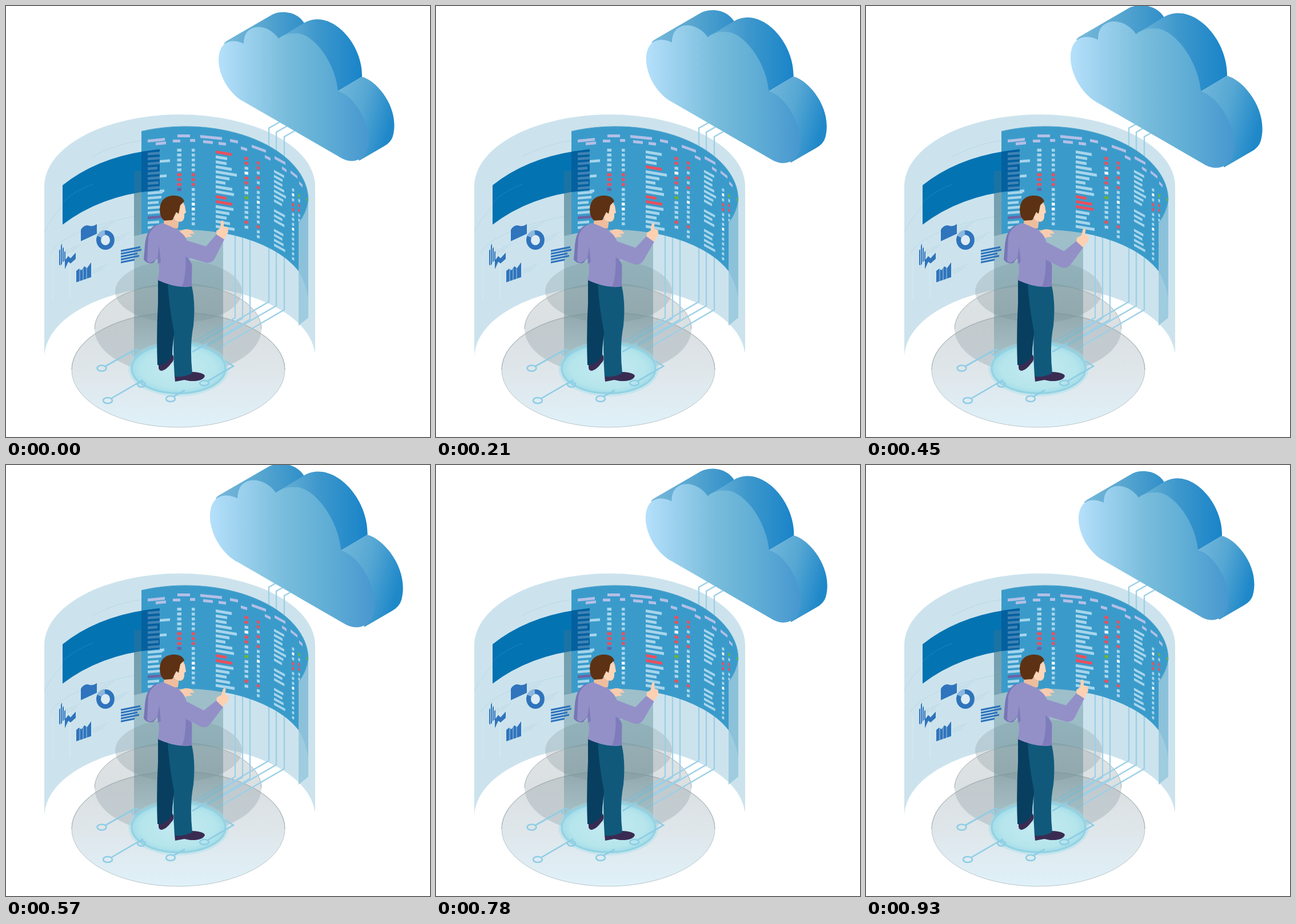
Write an HTML page that moves like this. It is 742 px wide and 755 px high and loops after 960 ms.

```html
<!DOCTYPE html>
<html lang="en">
<head>
<meta charset="utf-8">
<title>Cloud dashboard</title>
<style>
html, body { margin: 0; width: 100%; height: 100%; overflow: hidden; background: #fff; }
svg { display: block; width: 100vw; height: 100vh; }
</style>
</head>
<body>
<svg viewBox="0 0 742 755">
  <defs>
    <linearGradient id="front"><stop stop-color="#b5e0fb"/><stop offset=".45" stop-color="#78bcdb"/><stop offset=".72" stop-color="#5fadd5"/><stop offset="1" stop-color="#4797d0"/></linearGradient>
    <linearGradient id="sideA"><stop stop-color="#79b9da"/><stop offset=".5" stop-color="#57a6d0"/><stop offset="1" stop-color="#308fc9"/></linearGradient>
    <linearGradient id="sideB"><stop stop-color="#6db4d8"/><stop offset=".45" stop-color="#3f98cc"/><stop offset="1" stop-color="#1984c9"/></linearGradient>
    <linearGradient id="sideC" x1="0" y1="0" x2="1" y2=".4"><stop stop-color="#73b8db"/><stop offset=".5" stop-color="#56a7d3"/><stop offset="1" stop-color="#1f88c9"/></linearGradient>
    <linearGradient id="disc" x2="0" y2="1"><stop stop-color="#d9dddf"/><stop offset=".5" stop-color="#dfe6ea"/><stop offset="1" stop-color="#dff1f9"/></linearGradient>
    <linearGradient id="ring" x2="0" y2="1"><stop stop-color="#8b9ba1" stop-opacity=".28"/><stop offset="1" stop-color="#8b9ba1" stop-opacity=".34"/></linearGradient>
    <linearGradient id="beam" x2="0" y2="1"><stop stop-color="#4d8799" stop-opacity=".5"/><stop offset=".35" stop-color="#5f8f99" stop-opacity=".42"/><stop offset=".75" stop-color="#62888f" stop-opacity=".5"/><stop offset="1" stop-color="#7fb0b9" stop-opacity=".4"/></linearGradient>
    <radialGradient id="glow"><stop stop-color="#c3eaf0"/><stop offset=".8" stop-color="#b6e5ec"/><stop offset="1" stop-color="#a4dde9"/></radialGradient>
    <clipPath id="screenClip"><path id="screen" d="M237 219.500A215 129 0 0 1 529 340Q526 362 512 380V464.600A215 119 0 0 0 237 400Z"/></clipPath>
  </defs>

  <!-- curved wall -->
  <path fill="#cce3ed" d="M67 316A237 126 0 0 1 541 316V604L540.500 608A237 126 0 0 0 67 616Z"/>
  <g fill="none" stroke="#b9d9e7">
    <path d="M67 396Q92 345 150 314M150 264Q200 239 237 236M78 433Q100 392 237 366"/>
    <path stroke="#d9ebf2" d="M82 440V515M112 420V512"/>
  </g>

  <!-- platform -->
  <ellipse cx="301.500" cy="637.500" rx="186.500" ry="100.500" fill="url(#disc)" stroke="#b9c5ca"/>
  <ellipse cx="301" cy="566" rx="146" ry="80" fill="url(#ring)"/>
  <ellipse cx="302" cy="500" rx="111" ry="55" fill="url(#ring)"/>
  <g fill="none" stroke="#a2adb1">
    <path d="M115 637A186.500 100.500 0 0 1 488 637"/>
    <path d="M155 566A146 80 0 0 1 447 566"/>
  </g>
  <g id="cables" fill="none" stroke="#9bd0e8" stroke-width="2.300"></g>
  <path fill="url(#beam)" d="M237 400A215 119 0 0 1 380 396V622H224V289H237Z"/>
  <ellipse cx="302" cy="635" rx="88" ry="49" fill="#a3dce9" opacity=".4"/>
  <ellipse cx="302" cy="635" rx="82" ry="43.500" fill="url(#glow)" stroke="#93d3e3" stroke-width="3.500"/>
  <g fill="none" stroke="#8ecde5" stroke-width="2.600">
    <path d="M174 631L222 604M185 687L240 655M293 684L313 673M353 657L398 631L384 622M326 606L352 591"/>
    <ellipse cx="167.500" cy="634.500" rx="8" ry="5"/>
    <ellipse cx="178" cy="691" rx="8" ry="5"/>
    <ellipse cx="288" cy="688" rx="8" ry="5"/>
    <ellipse cx="347" cy="660.500" rx="8" ry="4.500"/>
    <ellipse cx="227" cy="607" rx="7" ry="4.500"/>
    <ellipse cx="237" cy="663" rx="7" ry="4.500"/>
  </g>

  <!-- screens -->
  <path fill="#9fccdf" d="M512 380Q526 362 529 340V546L512 560Z"/>
  <path fill="#8cc1da" d="M512 380Q526 362 529 340V511Q524 484 512 465Z"/>
  <use href="#screen" fill="#3a9bca"/>
  <path fill="none" stroke="#5ba7ce" d="M237 219.500A215 129 0 0 1 529 340Q526 362 512 380"/>
  <path fill="#0473b2" d="M99 314Q165 261 269 251V322Q168 330 99 383Z"/>
  <path fill="#04609f" d="M237 255L269 251V322L237 326Z"/>
  <path fill="#3f7488" opacity=".38" d="M224 289H237V400L224 403Z"/>
  <path fill="none" stroke="#2a89bf" stroke-width=".8" d="M99 344Q122 322 152 312"/>
  <g id="table" clip-path="url(#screenClip)"></g>

  <!-- small charts -->
  <g id="charts" fill="#2f74bc">
    <path d="M131 412V392Q137 382 146 385Q152 387 159 382V399Z"/>
    <path d="M103 461V446L109 438L113 442L122 432V443L113 451L109 448Z"/>
    <path d="M123 484V464L128 460L132 463L137 456L142 459L149 449V475Z"/>
    <path stroke="#cce3ed" stroke-width=".8" d="M129 457V485M135 455V483M141 455V480"/>
    <path d="M93 428L95 426V455L93 453ZM96 420L98 416V452L96 454ZM99 425L101 422V447L99 449ZM102 431L104 429V446L102 447Z"/>
    <ellipse cx="174" cy="410" rx="12" ry="13" fill="#dcebf4" stroke="#2f74bc" stroke-width="8"/>
    <path fill="none" stroke="#8db7df" stroke-width="8" d="M163 404A12 13 0 0 1 173 397"/>
  </g>

  <!-- person -->
  <path fill="#3a2b53" d="M267 627L292 611Q296 620 289 626Q281 637 273 639Q267 639 267 633Z"/>
  <path fill="#083f60" d="M266 479L292 486L298 560Q291 585 291 612Q280 630 265 629Q263 575 266 520Z"/>
  <path fill="#3a2b53" d="M295 648L326 641Q346 642 348 648Q345 658 322 657L312 655L296 658Z"/>
  <path fill="#11597b" d="M283 484L325 490Q332 520 328 560Q321 595 326 643Q312 651 295 649Q292 610 294 570Q285 525 283 484Z"/>
  <path fill="#f8cdaf" d="M303 396Q313 388 325 393L330 399L321 399L326 404L316 405L311 409Z"/>
  <path fill="#7775b6" d="M263 383Q245 391 243 420L241 444Q247 453 258 450L274 430Z"/>
  <path fill="#9390c8" d="M269 382Q277 377 299 390Q312 400 314 425L326 455L325 491Q300 496 265 480Q271 462 265 440Q253 455 247 446L249 405Q253 388 269 382Z"/>
  <path fill="#7f7cbb" d="M314 436L325 452V491L308 492Q316 472 314 436ZM265 440L268 420L271 448L266 452Z"/>
  <path fill="#eebd9d" d="M277 372L303 373L301 389Q296 391 288 386L276 381Z"/>
  <path fill="#fdd5b9" d="M292 350L309 342L313 350L315 362L312 364Q313 377 305 378Q294 377 291 366Z"/>
  <path fill="#5d3214" d="M312 342Q308 331 292 332Q270 334 269 356Q269 370 277 376L291 375L298 361L302 364L305 349Z"/>
  <g id="arm">
    <path fill="#fdd0b2" d="M369 404L368 394L375 389L376 378Q379 373 381 378L381 386L388 388L389 396L382 408L377 411Z"/>
    <path fill="#9390c8" d="M293 393Q309 393 317 411L350 421L368 400L382 409L366 441Q361 451 351 450L307 437Q291 420 293 393Z"/>
  </g>

  <!-- cloud -->
  <g id="cloud">
    <path fill="url(#sideA)" d="M381 66Q384 62 390 59L466 15C480 8 508 8 522 30L500 60L420 75Z"/>
    <path fill="url(#sideB)" d="M477 57L521 30C565 3 624 62 623 124L581 149Z"/>
    <path fill="url(#sideC)" d="M581 149L623 124C650 131 690 180 677 228Q674 239 661 246L618 271Z"/>
    <path fill="url(#front)" d="M416 66C400 58 372 57 372 96C373 125 393 156 417 168L588 267C613 280 636 264 635 233C632 194 606 156 581 149C577 101 540 50 510 48Q488 47 477 57C465 39 443 33 431 39Q416 45 416 66Z"/>
  </g>
</svg>
<script>
const $ = id => document.getElementById(id);
const RED = '#e8505f', PALE = '#a6d5ec', WHITE = '#f4fbff', GREEN = '#6cb52d', LILAC = '#b3bfe6', PURPLE = '#6a62a5';

// Bar with vertical ends whose right end is shifted by slope * w
const bar = (x, y, w, h, slope, fill) =>
  `<path fill="${fill}" d="M${x} ${y}l${w} ${w * slope}v${h}l${-w} ${-w * slope}z"/>`;

function column(x, y, count, step, size, slope, marks = {}) {
  let out = '';
  for (let i = 0; i < count; i++) out += bar(x, y + i * step, size, 5, slope, marks[i] || PALE);
  return out;
}

const STEP = 8.6;
const listWidths = [28, 20, 19, 28, 37, 24, 17, 29, 32, 19, 29, 31, 24, 19, 25, 33];
const cell = i => listWidths[i % 16];

const headers = [
  [248, 234, 30, -.1], [300, 225, 22, 0], [340, 226, 38, .1], [392, 233, 14, .2], [430, 243, 25, .36], [470, 263, 19, .55], [498, 288, 12, .8],
  [262, 239, 18, -.1], [292, 234, 13, 0], [322, 233, 9, 0], [345, 235, 17, .1], [372, 238, 13, .12], [411, 246, 11, .3], [453, 261, 10, .5], [483, 281, 8, .7], [513, 307, 6, 1]
];
let table = headers.map(([x, y, w, s]) => bar(x, y, w, 5, s, LILAC)).join('');
for (let i = 0; i < 16; i++) {
  const hidden = i < 8;
  const fill = i === 13 ? PURPLE : hidden ? '#3f83b5' : PALE;
  table += bar(248, 257 + i * STEP, Math.min(cell(i + 3), hidden ? 21 : 26), 4.6, -.08, fill);
}
table += [[270, 18], [296, 12], [322, 8]].map(([y, w]) => bar(269, y, w, 4.6, -.08, PALE)).join('');
table += column(299.5, 250, 9, STEP, 7.5, 0, { 5: RED, 6: RED, 7: RED, 8: PURPLE });
table += column(325, 250, 16, STEP, 5.5, .03, { 5: RED, 6: RED, 7: RED, 11: WHITE, 12: WHITE });
for (let i = 0; i < 16; i++) table += `<g class="row">${bar(367, 253 + i * 8.7, cell(i), 5, .17, PALE)}</g>`;
table += column(417.5, 264, 15, STEP, 6.5, .15, { 0: RED, 1: RED, 3: WHITE, 4: RED, 5: RED, 8: GREEN, 13: RED });
table += column(439, 272, 16, STEP, 5, .25, { 0: RED, 1: RED, 3: RED, 5: RED, 8: WHITE, 13: RED });
for (let i = 0; i < 16; i++)
  if (i !== 7 && i !== 11) table += bar(469, 287 + i * STEP, 8 + cell(i) * .35, 4.5, .55, PALE);
table += column(500.5, 319, 15, STEP, 3.8, .4, { 1: WHITE, 3: RED, 4: RED, 8: WHITE });
table += column(511.5, 329, 6, STEP, 3, .6, { 0: GREEN, 2: RED, 3: RED });
table += bar(525.5, 336, 2, 5, .6, GREEN);
$('table').innerHTML = table;

let charts = '';
[34, 36, 29, 32, 24].forEach((w, i) => charts += bar(201, 427.5 + i * 5, w, 3.2, -.2, '#2f74bc'));
for (const [x, y] of [[162, 389], [189, 407], [152, 462], [104, 428]])
  for (let i = 0; i < 3; i++) charts += bar(x, y + i * 3, 27 - i * 5, .8, -.4, '#b5d3e3');
$('charts').innerHTML += charts;

$('cables').innerHTML = [[401, 390, 546], [414, 395, 547], [427, 400, 549], [460, 214, 518], [473, 221, 525], [487, 229, 532]]
  .map(([x, top, end]) => `<path d="M${x + 30} ${top - 17}L${x} ${top}V${end}l-120 70"/>`).join('');

const rows = [...document.querySelectorAll('.row path')];
const LOOP = 960, RISE = 30, PEAK = 540, FALL = 555, REST = 930;
const ease = p => (1 - Math.cos(Math.PI * Math.min(1, Math.max(0, p)))) / 2;

function draw(now) {
  const t = now % LOOP;
  const lift = t < FALL ? ease((t - RISE) / (PEAK - RISE)) : 1 - ease((t - FALL) / (REST - FALL));
  $('cloud').setAttribute('transform', `translate(525 142) scale(${1 + .099 * lift}) translate(-525 -142)`);
  $('arm').setAttribute('transform', `rotate(${10.8 * lift} 300 405)`);
  const active = t < FALL ? Math.floor(11 * (t / 450) ** 1.6 + .01) : -1;
  rows.forEach((row, i) => row.setAttribute('fill', i === active || i === 9 || i === 10 ? RED : PALE));
}

const start = performance.now();
function tick() {
  draw(performance.now() - start);
  requestAnimationFrame(tick);
}
tick();
</script>
</body>
</html>
```
